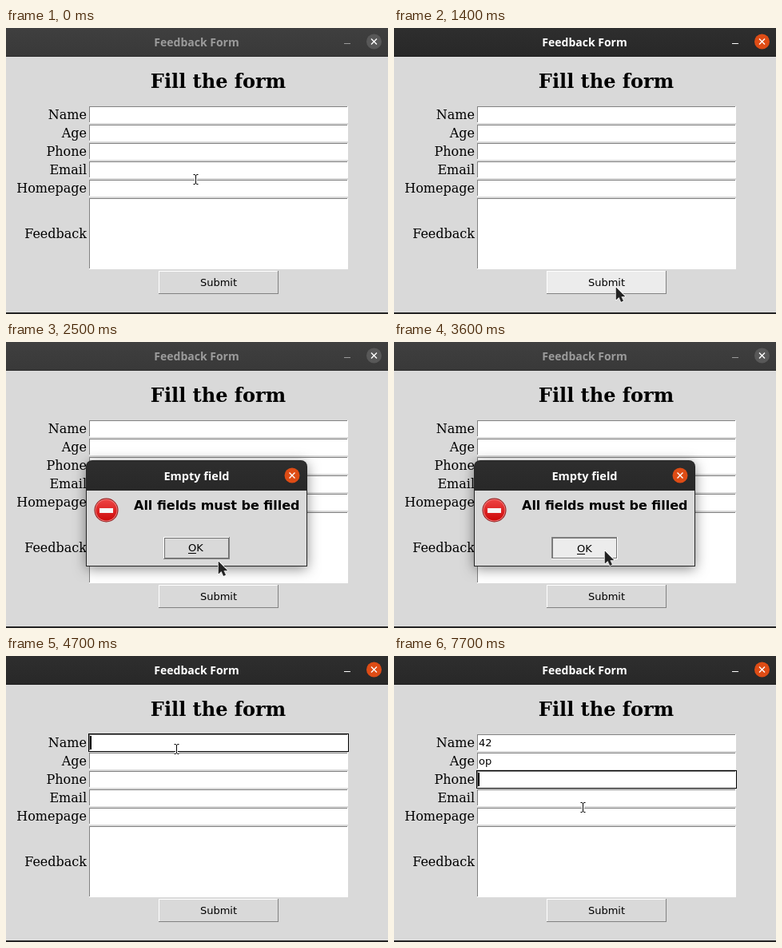
Write an HTML page with a canvas that moves like this. It is 478 by 358 pixels and loops after 8000 ms.

```html
<!DOCTYPE html>
<html lang="en">
<head>
<meta charset="utf-8">
<title>Feedback Form</title>
<style>
  html, body { margin: 0; height: 100%; overflow: hidden; background: #d9d9d9; }
  canvas { display: block; }
</style>
</head>
<body>
<canvas id="stage" width="478" height="358"></canvas>
<script>
const ctx = document.getElementById('stage').getContext('2d');

const LOOP = 8000, STEP = 100;
const GREY = '#d9d9d9', HOVER = '#ececec', DARK = '#828282';
const SANS = '"DejaVu Sans", sans-serif';
const SERIF = '"DejaVu Serif", serif';
const TITLE = '"Open Sans", "Noto Sans", sans-serif';
const FIELDS = ['Name', 'Age', 'Phone', 'Email', 'Homepage'];

// Pointer path: time, x, y
const PATH = [
  [0, 237, 189], [300, 237, 189], [400, 253, 228], [500, 253, 228],
  [900, 278, 325], [1800, 278, 325], [2300, 266, 283], [2400, 266, 283],
  [2500, 266, 275], [2700, 265, 264], [2800, 265, 264], [3000, 264, 262],
  [3800, 264, 262], [3900, 260, 221], [4500, 213, 116], [4800, 213, 116],
  [4900, 236, 189], [LOOP, 236, 189]
];

// Form input: time, name, age, focused row, caret visible
const INPUT = [
  [0, '', '', -1, false], [4700, '', '', 0, true], [6000, '4', '', 0, true],
  [6200, '42', '', 0, true], [6500, '42', '', 1, true], [7000, '42', '', 1, false],
  [7200, '42', '', 1, true], [7400, '42', 'o', 1, true], [7700, '42', 'op', 2, true]
];

function rect(x, y, w, h, color) {
  ctx.fillStyle = color;
  ctx.fillRect(x, y, w, h);
}

function text(str, x, y, font, color = '#000', align = 'left') {
  ctx.font = font;
  ctx.fillStyle = color;
  ctx.textAlign = align;
  ctx.fillText(str, x, y);
}

function relief(x, y, w, h, fill, sunken) {
  const [lit, shade] = sunken ? [DARK, '#fff'] : ['#fff', DARK];
  rect(x, y, w, h, shade);
  rect(x, y, w - 1, h - 1, lit);
  rect(x + 1, y + 1, w - 2, h - 2, fill);
}

function circle(x, y, r, color) {
  ctx.fillStyle = color;
  ctx.beginPath();
  ctx.arc(x, y, r, 0, Math.PI * 2);
  ctx.fill();
}

function vertical(y0, y1, top, bottom) {
  const g = ctx.createLinearGradient(0, y0, 0, y1);
  g.addColorStop(0, top);
  g.addColorStop(1, bottom);
  return g;
}

function closeButton(x, y, color) {
  circle(x, y, 9.5, color);
  ctx.strokeStyle = '#fff';
  ctx.lineWidth = 1.4;
  ctx.beginPath();
  ctx.moveTo(x - 3.5, y - 3.5); ctx.lineTo(x + 3.5, y + 3.5);
  ctx.moveTo(x + 3.5, y - 3.5); ctx.lineTo(x - 3.5, y + 3.5);
  ctx.stroke();
}

function drawWindow(active) {
  rect(0, 0, 478, 358, GREY);
  rect(0, 0, 478, 35, active ? vertical(0, 35, '#2e2e2e', '#282828') : vertical(0, 35, '#3f3f3f', '#393939'));
  rect(0, 35, 478, 1, active ? '#1c1c1c' : '#2a2a2a');
  rect(0, 356, 478, 2, '#242424');
  const color = active ? '#fff' : '#9b9b9b';
  text('Feedback Form', 238.5, 23, `bold 14px ${TITLE}`, color, 'center');
  rect(423, 19, 8, 1, color);
  closeButton(460.5, 17, active ? '#de4c15' : '#585858');
}

function drawForm([, name, age, focus, caret], hover, pressed) {
  text('Fill the form', 265.5, 75, `bold 24px ${SERIF}`, '#000', 'center');
  FIELDS.forEach((label, row) => {
    const y = 97 + 23 * row, value = [name, age][row] || '';
    text(label, 101, y + 17, `16px ${SERIF}`, '#000', 'right');
    if (row === focus) rect(103, y, 326, 23, '#000');
    relief(104, y + 1, 324, 21, '#fff', true);
    text(value, 106, y + 16, `13px ${SANS}`);
    if (row === focus && caret) rect(105 + 8 * value.length, y + 3, 2, 17, '#000');
  });
  text('Feedback', 101, 263, `16px ${SERIF}`, '#000', 'right');
  relief(104, 213, 324, 89, '#fff', true);
  relief(191, 304, 150, 29, hover ? HOVER : GREY, pressed);
  const shift = pressed ? 1 : 0;
  text('Submit', 266 + shift, 323 + shift, `13px ${SANS}`, '#000', 'center');
}

function drawDialog(hover, pressed) {
  ctx.save();
  ctx.shadowColor = 'rgba(0,0,0,.45)';
  ctx.shadowBlur = 16;
  ctx.shadowOffsetY = 3;
  ctx.fillStyle = '#262626';
  ctx.beginPath();
  ctx.roundRect(100, 148, 277, 133, [8, 8, 0, 0]);
  ctx.fill();
  ctx.restore();
  ctx.fillStyle = vertical(149, 185, '#2e2e2e', '#282828');
  ctx.beginPath();
  ctx.roundRect(101, 149, 275, 36, [7, 7, 0, 0]);
  ctx.fill();
  rect(101, 186, 275, 94, GREY);
  text('Empty field', 238.5, 173, `bold 14.5px ${TITLE}`, '#fff', 'center');
  closeButton(358, 167, '#de4c15');

  circle(125.5, 210.5, 15, '#8e1212');
  circle(125.5, 210.5, 14, '#f08080');
  circle(125.5, 210.5, 13, vertical(197, 224, '#ee4545', '#cc0808'));
  rect(117, 208, 17, 6, '#f6f6f6');
  text('All fields must be filled', 160, 210, `bold 16px ${SANS}`);

  relief(197, 244, 83, 28, hover ? HOVER : GREY, pressed);
  ctx.strokeStyle = '#000';
  ctx.lineWidth = 1;
  ctx.setLineDash([1, 1]);
  ctx.strokeRect(198.5, 245.5, 80, 25);
  ctx.setLineDash([]);
  const shift = pressed ? 1 : 0;
  text('OK', 228 + shift, 262 + shift, `13px ${SANS}`);
  rect(228 + shift, 264 + shift, 10, 1, '#000');
}

function outlined(path, inner, outer) {
  ctx.strokeStyle = '#fff';
  ctx.lineWidth = outer;
  ctx.stroke(path);
  ctx.strokeStyle = '#000';
  ctx.lineWidth = inner;
  ctx.stroke(path);
}

const BEAM = new Path2D('M-2.5 -5.5H-1L0.5 -4.5L2 -5.5H3.5M0.5 -4.5V5.5M-2.5 6.5H-1L0.5 5.5L2 6.5H3.5');
const ARROW = new Path2D('M0 0V15L3.6 11.8L6.2 17.6L8.7 16.5L6.1 10.9H10.8Z');

function drawPointer(x, y, arrow) {
  ctx.save();
  ctx.translate(Math.round(x), Math.round(y));
  if (arrow) {
    ctx.lineJoin = 'round';
    outlined(ARROW, 0.5, 2);
    ctx.fillStyle = '#222';
    ctx.fill(ARROW);
  } else {
    outlined(BEAM, 1, 3);
  }
  ctx.restore();
}

function pointerAt(t) {
  const i = PATH.findIndex(p => p[0] > t);
  const [t0, x0, y0] = PATH[i - 1], [t1, x1, y1] = PATH[i];
  const k = (t - t0) / (t1 - t0);
  return [x0 + (x1 - x0) * k, y0 + (y1 - y0) * k];
}

function draw(now) {
  const t = Math.floor((now % LOOP) / STEP) * STEP;
  const [x, y] = pointerAt(t);
  const dialog = t >= 1500 && t < 3800;
  const overSubmit = !dialog && y > 303;
  drawWindow(t >= 1200 && !dialog);
  drawForm(INPUT.findLast(s => s[0] <= t), overSubmit, t >= 1200 && t < 1400);
  if (dialog) drawDialog(y < 272, t >= 3600);
  drawPointer(x, y, dialog || overSubmit);
}

const start = performance.now();
function tick() {
  draw(performance.now() - start);
  requestAnimationFrame(tick);
}
tick();
</script>
</body>
</html>
```
